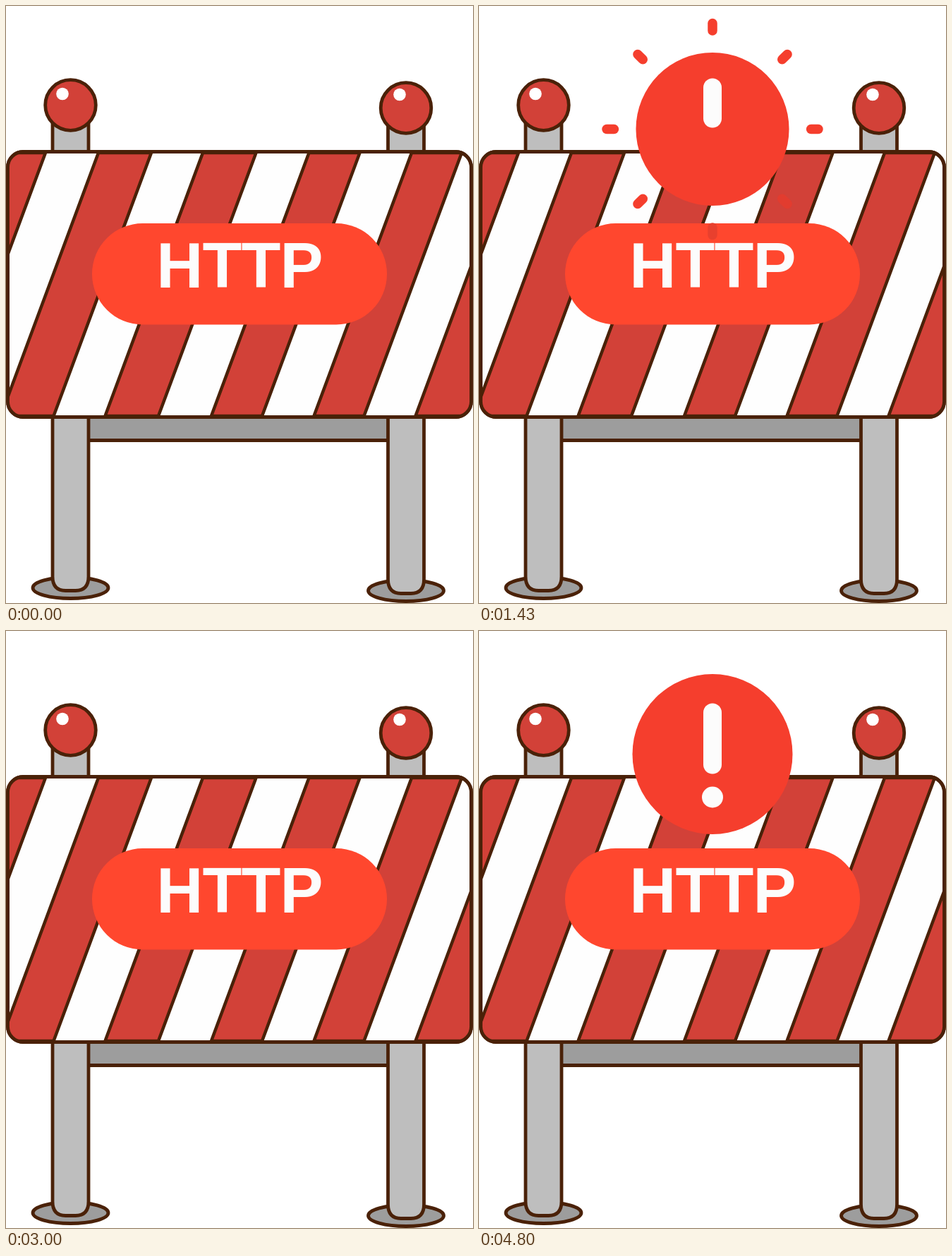
An HTML page that plays this animation: 662x846 px, repeating every 5010 ms.

```html
<!DOCTYPE html>
<html lang="en">
<head>
<meta charset="utf-8">
<title>HTTP barrier</title>
<style>
  html, body { margin: 0; width: 100%; height: 100%; overflow: hidden; background: #fff; }
  svg { display: block; width: 662px; height: 846px; }
  text { font: bold 91.5px "Liberation Sans", Arial, sans-serif; letter-spacing: -.8px; }
</style>
</head>
<body>
<svg viewBox="0 0 662 846">
  <defs>
    <clipPath id="board"><rect x="2.5" y="206.5" width="657" height="376" rx="22"/></clipPath>
    <g id="post">
      <ellipse cy="684" rx="53.5" ry="15" fill="#9d9d9d"/>
      <path d="M-25.5 20V668Q-25.5 688 -7 688H7Q25.5 688 25.5 668V20" fill="#bebebe"/>
      <circle r="35.8" fill="#d24138"/>
    </g>
  </defs>
  <g stroke="#4a2108" stroke-width="4.8">
    <path d="M115 570H545V615.5H115Z" fill="#9d9d9d"/>
    <use href="#post" x="91.5" y="140.5"/>
    <use href="#post" x="567" y="144.5"/>
    <rect x="2.5" y="206.5" width="657" height="376" rx="22" fill="#fefefe"/>
    <g id="stripes" clip-path="url(#board)" fill="#d24138" stroke-width="4.5"/>
    <rect x="2.5" y="206.5" width="657" height="376" rx="22" fill="none"/>
  </g>
  <g fill="#fff">
    <circle cx="80" cy="124.5" r="8.8"/>
    <circle cx="558" cy="125.5" r="8.8"/>
  </g>
  <rect x="122" y="308" width="418" height="143.5" rx="71.7" fill="#ff472e"/>
  <text x="331" y="399" text-anchor="middle" fill="#fcfcfc">HTTP</text>
  <g transform="translate(331 174.5)">
    <g id="rays" stroke-width="13.5" stroke-linecap="round"/>
    <circle id="disc" fill="#f53e2d"/>
    <rect id="bar" x="-13" y="-72" width="26" fill="#fcfcfc"/>
    <circle id="dot" cy="61" fill="#fcfcfc"/>
  </g>
</svg>
<script>
const $ = id => document.getElementById(id);
const add = (parent, tag, attrs) => {
  const el = document.createElementNS("http://www.w3.org/2000/svg", tag);
  set(el, attrs);
  return parent.appendChild(el);
};
function set(el, attrs) {
  for (const k in attrs) el.setAttribute(k, attrs[k]);
}

// Red slanted bands: left and right edge where they meet the top of the board
for (const [a, b] of [[-40, 56], [131, 206], [279, 354.5], [429.5, 501.5], [575, 646], [719, 800]])
  add($("stripes"), "path", { d: `M${a} 208H${b}L${b - 138.5} 581H${a - 138.5}Z` });

const rays = Array.from({ length: 8 }, (_, i) => add($("rays"), "line", {
  transform: `rotate(${i * 45})`,
  stroke: i === 3 ? "#e23c2f" : i === 4 ? "#e8402e" : "#f53e2d"
}));

const ramp = (t, from, to) => Math.min(1, Math.max(0, (t - from) / (to - from)));
const easeOut = (p, power) => 1 - (1 - p) ** power;

function draw(now) {
  const t = now % 5010;
  const beat = t >= 5000 ? 1000 : t % 1000;
  // 20 poses a second, shown for 30 and 70 ms in turn
  const pose = Math.min(16, Math.floor(beat / 100) * 2 + (beat % 100 >= 30));
  const ms = pose * 50;

  $("disc").setAttribute("r", 113.5 * easeOut(ramp(ms, 0, 695), 3));

  const h = 100 * ramp(ms, 240, 540);
  set($("bar"), { height: h, rx: Math.min(13, h / 2), ry: Math.min(13, h / 2) });
  $("dot").setAttribute("r", 15 * easeOut(ramp(ms, 500, 800), 2));

  const inner = 110 + 40 * easeOut(ramp(ms, 300, 606), 2);
  const outer = 110 + 40 * easeOut(ramp(ms, 250, 450), 2);
  $("rays").setAttribute("visibility", ms > 250 && ms < 610 ? "visible" : "hidden");
  for (const ray of rays) set(ray, { y1: -inner, y2: -outer });
}

let start;
function tick(now) {
  start ??= now;
  draw(now - start);
  requestAnimationFrame(tick);
}
draw(0);
requestAnimationFrame(tick);
</script>
</body>
</html>
```
